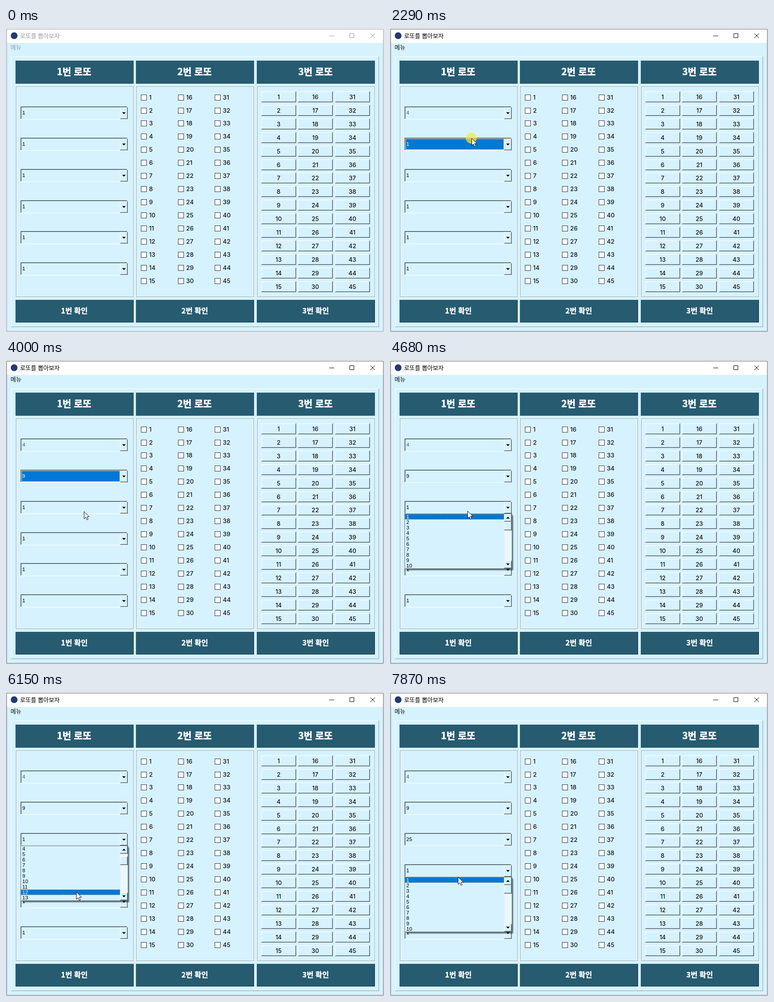
These frames come from a looping animation (835x671 px, 8000 ms). An HTML page:

```html
<!DOCTYPE html>
<html lang="ko">
<head>
<meta charset="utf-8">
<title>로또를 뽑아보자</title>
<style>
  html, body { margin: 0; width: 100%; height: 100%; overflow: hidden; background: #d6f2ff; }
  svg { display: block; width: 835px; height: 671px; }
  rect, .crisp { shape-rendering: crispEdges; }
  text { white-space: pre; }
  .ui { font: 13px "Noto Sans CJK KR", "Noto Sans CJK", sans-serif; }
  .head, .ok { font: 900 21px "Noto Sans CJK KR", "Noto Sans CJK", sans-serif; fill: #fff; stroke: #fff; stroke-width: .6; text-anchor: middle; }
  .ok { font-size: 16.2px; stroke-width: .4; }
  .num { font: 500 13.2px Inter, sans-serif; fill: #111; }
  .mid { text-anchor: middle; }
  .field { font: 11.5px "Liberation Sans", Arial, sans-serif; fill: #000; }
</style>
</head>
<body>
<svg viewBox="0 0 835 671">
  <defs>
    <filter id="shade" x="-10%" y="-10%" width="125%" height="125%">
      <feGaussianBlur stdDeviation="1.3"/>
    </filter>
  </defs>
  <g id="still"></g>
  <g id="live"></g>
</svg>
<script>
const LOOP = 8000, TICK = 66, GLIDE = 250, HOLD = 140, ROW = 12, VISIBLE = 10;
const SKY = '#d6f2ff', TEAL = '#265b70', BLUE = '#0078d7';
const WHITE = '#fff', DARK = '#4d5a60', SHADOW = '#96a9b2';

const rect = (x, y, w, h, fill, extra = '') =>
  `<rect x="${x}" y="${y}" width="${w}" height="${h}" fill="${fill}" ${extra}/>`;
const outline = (x, y, w, h, stroke, fill = 'none') =>
  rect(x + .5, y + .5, w - 1, h - 1, fill, `stroke="${stroke}"`);
const text = (x, y, cls, str, extra = '') =>
  `<text x="${x}" y="${y}" class="${cls}" ${extra}>${str}</text>`;
// One-pixel frame: one colour for the upper-left edges, another for the lower-right.
const bevel = (x, y, w, h, tl, br) =>
  rect(x, y, w, 1, tl) + rect(x, y, 1, h, tl) +
  rect(x, y + h - 1, w, 1, br) + rect(x + w - 1, y, 1, h, br);
const raised = (x, y, w, h) =>
  rect(x, y, w, h, SKY) + bevel(x, y, w, h, WHITE, DARK) + bevel(x + 1, y + 1, w - 2, h - 2, SKY, SHADOW);
const triangle = (x, y, dir) =>
  `<path class="crisp" d="M${x - 4} ${y - 2 * dir}h8l-4 ${4 * dir}z" fill="#000"/>`;

const comboTop = i => Math.round(173.2 + 68.8 * i);
const listTop = i => comboTop(i) + 29;
const rowY = (i, row) => listTop(i) + ROW * row + 5;

function drawPanel(i) {
  const x = Math.round(21 + 266.4 * i);
  return rect(x, 72, 261, 51, TEAL) + text(x + 129.5, 104, 'head', `${i + 1}번 로또`) +
    outline(x + 2, 130, 260, 465, WHITE) + outline(x + 1, 129, 260, 465, '#93a4ab') +
    rect(x, 600, 261, 50, TEAL) + bevel(x, 600, 261, 50, TEAL, '#14313d') +
    text(x + 130, 630, 'ok', `${i + 1}번 확인`);
}

function drawNumber(n) {
  const col = Math.floor(n / 15), row = n % 15;
  const bx = Math.round(298 + 81.5 * col), by = Math.round(146.6 + 28.93 * row);
  const x = Math.round(564 + 81.4 * col), y = Math.round(140 + 29.9 * row);
  return outline(bx, by, 13, 13, '#333', WHITE) + text(bx + 18, by + 11, 'num', n + 1) +
    raised(x, y, 77, 24) + text(x + 38.2, y + 16.5, 'num mid', n + 1);
}

function drawCombo(i) {
  const y = comboTop(i);
  return bevel(32, y, 237, 29, '#7f8d94', WHITE) + bevel(33, y + 1, 235, 27, '#47535a', SKY) +
    raised(252, y + 2, 17, 26) + triangle(260, y + 15, 1);
}

const repeat = (n, draw) => Array.from({ length: n }, (_, i) => draw(i)).join('');

const drawStill = () =>
  rect(0, 0, 835, 671, '#f0f2f3') + rect(2, 3, 831, 30, WHITE) + rect(2, 33, 831, 636, SKY) +
  '<circle cx="18" cy="17" r="7.5" fill="#1d3c76"/>' +
  bevel(11, 63, 813, 597, WHITE, '#8f9ca2') +
  repeat(3, drawPanel) + repeat(45, drawNumber) + repeat(6, drawCombo);

// One round per combo box: press it, turn the wheel in bursts of notches, pick a value.
const rounds = [
  { press: 1230, pick: 1830, value: 4, wheel: [] },
  { press: 2290, pick: 3180, value: 9, wheel: [{ at: 2750, notches: 1 }] },
  { press: 4340, pick: 7040, value: 25, wheel: [{ at: 5280, notches: 1 }, { at: 6380, notches: 6 }] },
  { press: 7530, pick: LOOP, value: 1, wheel: [] },
];
const moves = [
  { at: 620, x: 180, y: 192 },
  { at: 1430, x: 180, y: rowY(0, 3) },
  { at: 2690, x: 175, y: rowY(1, 5) },
  { at: 3800, x: 171, y: 333 },
  { at: 4690, x: 165, y: rowY(2, 4) },
  { at: 5870, x: 155, y: rowY(2, 8) },
  { at: 6730, x: 158, y: rowY(2, 3) },
  { at: 7180, x: 150, y: 408 },
];

const within = (t, from, length) => t >= from && t < from + length;
const clamp = (v, lo, hi) => Math.min(hi, Math.max(lo, v));
const closes = round => round.pick + HOLD / 2;

function pointer(t) {
  const q = Math.floor(t / TICK) * TICK;
  let x = 480, y = -25;
  for (const m of moves) {
    const u = clamp((q - m.at) / GLIDE, 0, 1), ease = u * u * (3 - 2 * u);
    x += (m.x - x) * ease;
    y += (m.y - y) * ease;
  }
  return [Math.round(x), Math.round(y)];
}

const scrolled = (round, t) => round.wheel.reduce((sum, w) =>
  sum + 3 * clamp(Math.floor((t - w.at) / 70) + 1, 0, w.notches), 0);

function drawChrome(active) {
  const ink = active ? '#000' : '#999', edge = active ? '#626568' : '#9a9da0';
  return bevel(1, 2, 833, 668, edge, edge) +
    text(31, 21.5, 'ui', '로또를 뽑아보자', `fill="${ink}"`) +
    text(10, 47, 'ui', '메뉴', `fill="${active ? '#111' : '#8b9ca5'}"`) +
    rect(714, 17, 11, 1, ink) + outline(759, 12, 10, 10, ink) +
    `<path d="M805 12l10 10m0-10l-10 10" stroke="${ink}" fill="none"/>`;
}

function drawField(i, t) {
  const y = comboTop(i), round = rounds[i], next = rounds[i + 1];
  const picked = round && t >= closes(round);
  const lit = round && (within(t, round.press, HOLD) || (picked && next && t < next.press));
  const ink = lit ? WHITE : picked && i === 0 ? '#1f63a8' : '#000';
  return (lit ? rect(35, y + 3, 216, 23, BLUE) : '') +
    text(36, y + 18, 'field', picked ? round.value : 1, `style="fill:${ink}"`);
}

function drawList(i, t, mouseY) {
  const y = listTop(i), first = scrolled(rounds[i], t);
  const hover = clamp(Math.floor((mouseY - y) / ROW), 0, VISIBLE - 1);
  const drawRow = r => {
    const top = y + ROW * r, lit = r === hover;
    return (lit ? rect(33, top, 219, ROW, BLUE) +
        rect(33.5, top + .5, 218, ROW - 1, 'none', 'stroke="#d08b45" stroke-dasharray="1 1"') : '') +
      text(36, top + 10, 'field', first + r + 1, lit ? 'style="fill:#fff"' : '');
  };
  return rect(36, y + 3, 236, 121, '#000', 'opacity=".55" filter="url(#shade)"') +
    outline(32, y - 1, 238, 122, '#65737a', SKY) + repeat(VISIBLE, drawRow) +
    rect(252, y, 17, 120, '#ebf7fd') + raised(252, y, 17, 17) + raised(252, y + 103, 17, 17) +
    raised(252, Math.round(y + 17 + first / 45 * 87), 17, 19) +
    triangle(260, y + 8, -1) + triangle(260, y + 111, 1);
}

const drawPointer = (x, y, pressed) =>
  (pressed ? `<circle cx="${x - .5}" cy="${y}" r="12" fill="#eeee3c" opacity=".7"/>` : '') +
  `<path transform="translate(${x} ${y})" d="M.5 .5v16l3.7-3.5 2.5 5.8 2.7-1.1-2.5-5.7h5z"
    fill="#fff" stroke="#111"/>`;

function drawLive(t) {
  const [x, y] = pointer(t);
  const open = rounds.findIndex(r => t >= r.press + HOLD && t < closes(r));
  const pressed = rounds.some(r => within(t, r.press, HOLD) || within(t, r.pick, HOLD));
  return drawChrome(t >= rounds[0].press) + repeat(6, i => drawField(i, t)) +
    (open < 0 ? '' : drawList(open, t, y)) + drawPointer(x, y, pressed);
}

const live = document.getElementById('live');
document.getElementById('still').innerHTML = drawStill();
const start = performance.now();
let shown = '';

function frame() {
  const next = drawLive((performance.now() - start) % LOOP);
  if (next !== shown) live.innerHTML = shown = next;
  requestAnimationFrame(frame);
}
frame();
</script>
</body>
</html>
```
